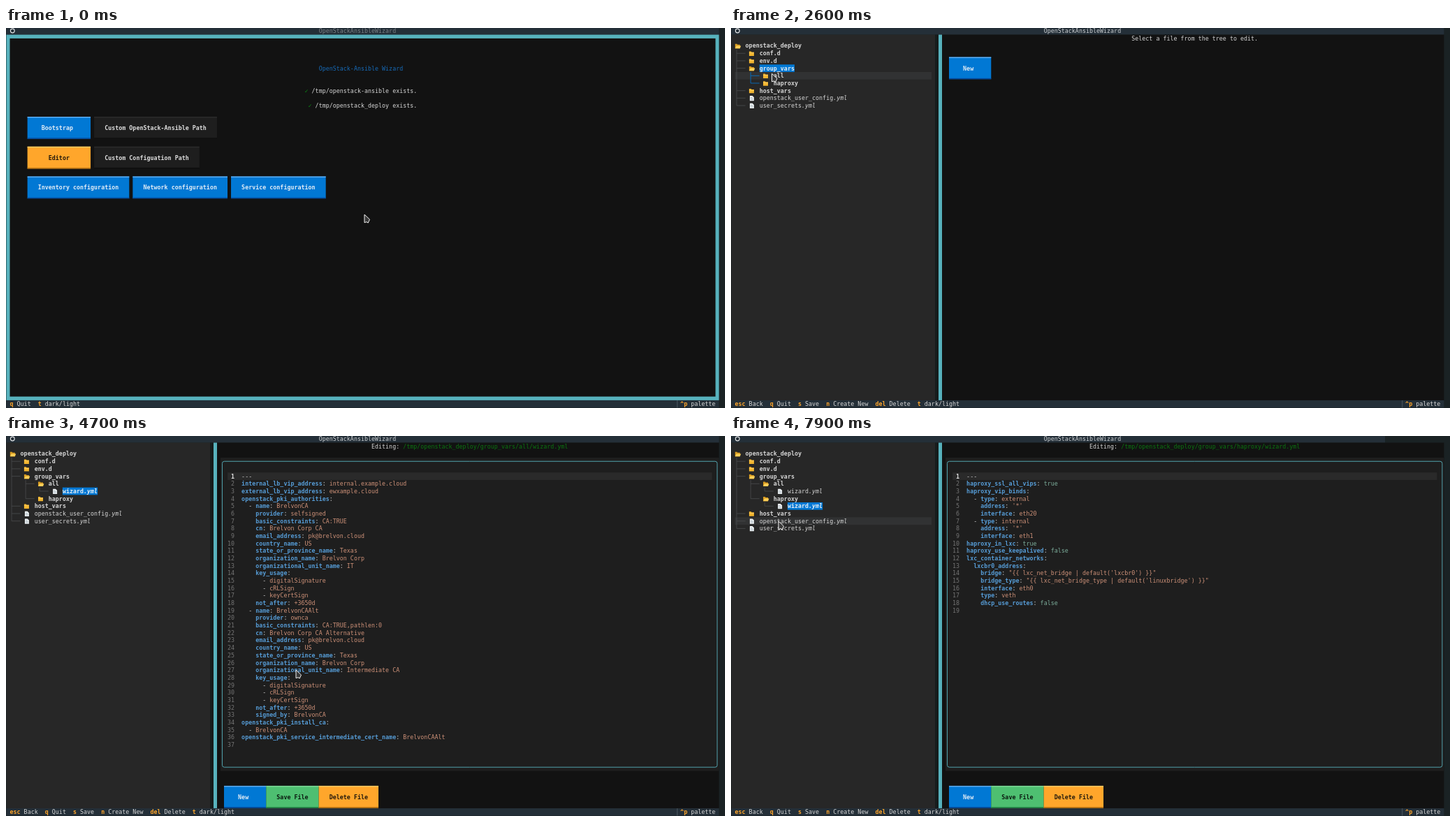
These frames come from a looping animation (1029 by 544 pixels, 8 s). An HTML page with a canvas:

```html
<!DOCTYPE html>
<html lang="en">
<head>
<meta charset="utf-8">
<title>Deployment wizard</title>
<style>
  html, body { margin: 0; width: 100%; height: 100%; overflow: hidden; background: #1a2224; }
  canvas { display: block; }
</style>
</head>
<body>
<canvas id="stage" width="1029" height="544"></canvas>
<script>
const ctx = document.getElementById('stage').getContext('2d');
const LOOP = 8000, STEP = 100;
const CELL_W = 5.024, CELL_H = 10.68, COLS = 203;
const TEAL = '#57b2bd', BLUE = '#0178d4', ORANGE = '#ffa62b', GREEN = '#0b7410', FG = '#d6d6d6';

const colX = col => 0.5 + col * CELL_W;
const rowY = row => row * CELL_H - 1.1;

function rect(x0, y0, x1, y1, color) {
  ctx.fillStyle = color;
  ctx.fillRect(x0, y0, x1 - x0, y1 - y0);
}

function cells(col, row, width, height, color) {
  rect(colX(col), rowY(row), colX(col + width), rowY(row + height), color);
}

// Writes one glyph per terminal cell and returns the column after the text.
function text(col, row, string, color = FG, style = '') {
  ctx.save();
  ctx.translate(colX(col), rowY(row) + 8.2);
  ctx.scale(0.1, 0.1);
  ctx.font = `${style} 83.45px "DejaVu Sans Mono", monospace`;
  ctx.fillStyle = color;
  [...string].forEach((char, i) => {
    if (char !== ' ') ctx.fillText(char, i * CELL_W * 10, 0);
  });
  ctx.restore();
  return col + string.length;
}

function lines(color, width, ...paths) {
  ctx.strokeStyle = color;
  ctx.lineWidth = width;
  ctx.beginPath();
  for (const [x0, y0, x1, y1] of paths) {
    ctx.moveTo(x0, y0);
    ctx.lineTo(x1, y1);
  }
  ctx.stroke();
}

function polygon(points, fill) {
  ctx.beginPath();
  points.forEach(([x, y]) => ctx.lineTo(x, y));
  ctx.closePath();
  ctx.fillStyle = fill;
  ctx.fill();
}

const BUTTONS = {
  primary: [BLUE, '#66b2f5', '#06489a', '#e2ecf6'],
  warning: [ORANGE, '#ffd066', '#b97310', '#21180c'],
  success: ['#4ebf71', '#82e29c', '#1f8345', '#0b1a10'],
  plain: ['#1e1e1e', '#2c2c2c', '#0d0d0d', '#dedede'],
};

function button(col, row, width, label, kind = 'primary') {
  const [fill, top, bottom, color] = BUTTONS[kind];
  const x0 = colX(col), x1 = colX(col + width), y0 = rowY(row), y1 = rowY(row + 3);
  rect(x0, y0, x1, y1 - 0.4, fill);
  rect(x0, y0, x1, y0 + 1.4, top);
  rect(x0, y1 - 1.8, x1, y1 - 0.4, bottom);
  text(col + Math.floor((width - label.length) / 2), row + 1, label, color, 'bold');
}

function bars(titleColor, headerEnd, keys) {
  rect(0.5, 0, headerEnd, rowY(1), '#242f38');
  rect(0.5, rowY(50), 1020.4, 543.6, '#242f38');
  ctx.beginPath();
  ctx.arc(9.3, 4, 2.9, 0, 7);
  ctx.strokeStyle = '#e4e6e8';
  ctx.lineWidth = 1.1;
  ctx.stroke();
  text(89, 0, 'OpenStackAnsibleWizard', titleColor);
  let col = 1;
  for (const [key, label] of keys) {
    col = text(col, 50, key, ORANGE, 'bold') + 1;
    col = text(col, 50, label) + 2;
  }
  lines('#55616a', 0.8, [960.7, rowY(50), 960.7, 543.6]);
  text(192, 50, '^p', ORANGE, 'bold');
  text(195, 50, 'palette');
}

function homeScreen() {
  bars('#7c8287', 1020.4, [['q', 'Quit'], ['t', 'dark/light']]);
  rect(0.5, rowY(1), 1020.4, rowY(50), TEAL);
  rect(5.5, 14.9, 1015.4, 527.6, '#121212');
  text(89, 5, 'OpenStack-Ansible Wizard', '#176bb8');
  text(85, 8, '✓', '#0b8a14');
  text(87, 8, '/tmp/openstack-ansible exists.');
  text(86, 10, '✓', '#0b8a14');
  text(88, 10, '/tmp/openstack_deploy exists.');
  button(6, 12, 18, 'Bootstrap');
  button(25, 12, 35, 'Custom OpenStack-Ansible Path', 'plain');
  button(6, 16, 18, 'Editor', 'warning');
  button(25, 16, 30, 'Custom Configuation Path', 'plain');
  button(6, 20, 29, 'Inventory configuration');
  button(36, 20, 27, 'Network configuration');
  button(64, 20, 27, 'Service configuration');
}

const folder = (name, ...kids) => ({ name, kids });
const file = name => ({ name });
const allFile = file('wizard.yml'), proxyFile = file('wizard.yml');
const allDir = folder('all', allFile), proxyDir = folder('haproxy', proxyFile);
const groupVars = folder('group_vars', allDir, proxyDir);
const root = folder('openstack_deploy', folder('conf.d'), folder('env.d'), groupVars,
  folder('host_vars'), file('openstack_user_config.yml'), file('user_secrets.yml'));

const opensAt = new Map([[root, 0], [groupVars, 2300], [allDir, 3100], [proxyDir, 5500]]);
const selections = [[0, root], [2300, groupVars], [3100, allDir], [3800, allFile],
  [5500, proxyDir], [6400, proxyFile]];

function icon(col, row, node, open) {
  const x = colX(col) + 0.3, y = rowY(row) + 2;
  if (!node.kids) {
    polygon([[x + 1, y], [x + 4.7, y], [x + 7, y + 2.2], [x + 7, y + 7.3], [x + 1, y + 7.3]], '#eef2f4');
    lines('#9aaab4', 0.6, [x + 2, y + 2.5, x + 4.6, y + 2.5], [x + 2, y + 4, x + 6, y + 4], [x + 2, y + 5.5, x + 6, y + 5.5]);
    return;
  }
  polygon([[x, y + 0.6], [x + 2.8, y + 0.6], [x + 3.6, y + 1.6], [x + 7, y + 1.6], [x + 7, y + 7], [x, y + 7]],
    open ? '#d69a20' : '#f2b52f');
  if (open) polygon([[x + 1.8, y + 3.2], [x + 8.4, y + 3.2], [x + 7, y + 7], [x + 0.2, y + 7]], '#ffd059');
  else rect(x, y + 2.5, x + 7, y + 3.2, '#ffd675');
}

function drawTree(time, pointer, selected) {
  const focused = time >= 2300;
  const overTree = pointer.x > 6 && pointer.x < 287;
  const hoverRow = overTree ? Math.floor((pointer.y + 1.1) / CELL_H) : -1;
  let nextRow = 2;

  // "trail" holds, per level, whether that branch continues below.
  function drawNode(node, trail, parents, hovered) {
    const row = nextRow++, depth = trail.length;
    const open = node.kids && time >= (opensAt.get(node) ?? Infinity);
    const y = rowY(row), mid = y + CELL_H / 2, bottom = y + CELL_H;
    hovered ||= row === hoverRow;
    if (hovered) rect(5.5, y, 287, bottom, focused ? '#313233' : '#272727');
    trail.forEach((continues, level) => {
      const x = colX(1.5 + level * 4), own = level === depth - 1;
      const color = focused && parents[level] === selected ? BLUE : '#4b4d4e';
      if (own) lines(color, 0.8, [x, y, x, continues ? bottom : mid], [x, mid, colX(4 + level * 4), mid]);
      else if (continues) lines(color, 0.8, [x, y, x, bottom]);
    });
    const iconCol = 1 + depth * 4, textCol = iconCol + 3;
    icon(iconCol, row, node, open);
    const isSelected = node === selected;
    if (isSelected) cells(textCol, row, node.name.length, 1, focused ? BLUE : '#173c56');
    const weight = node.kids || isSelected ? 'bold' : '';
    const color = isSelected ? '#e8eff6' : FG;
    const split = node.kids ? node.name.length : node.name.indexOf('.');
    const end = text(textCol, row, node.name.slice(0, split), color, weight);
    text(end, row, node.name.slice(split), color, 'italic ' + weight);
    if (open) node.kids.forEach((kid, i) =>
      drawNode(kid, [...trail, i < node.kids.length - 1], [...parents, node], hovered));
  }

  rect(0.5, rowY(1), 292, rowY(50), focused ? '#272727' : '#1e1e1e');
  drawNode(root, [], [], false);
}

const authority = (name, provider, constraints, cn, unit) => `  - name: ${name}
    provider: ${provider}
    basic_constraints: ${constraints}
    cn: ${cn}
    email_address: pk@brelvon.cloud
    country_name: US
    state_or_province_name: Texas
    organization_name: Brelvon Corp
    organizational_unit_name: ${unit}
    key_usage:
      - digitalSignature
      - cRLSign
      - keyCertSign
    not_after: +3650d
`;

const allYaml = `---
internal_lb_vip_address: internal.example.cloud
external_lb_vip_address: ewxample.cloud
openstack_pki_authorities:
${authority('BrelvonCA', 'selfsigned', 'CA:TRUE', 'Brelvon Corp CA', 'IT')}${
  authority('BrelvonCAAlt', 'ownca', 'CA:TRUE,pathlen:0', 'Brelvon Corp CA Alternative', 'Intermediate CA')
}    signed_by: BrelvonCA
openstack_pki_install_ca:
  - BrelvonCA
openstack_pki_service_intermediate_cert_name: BrelvonCAAlt
`;

const proxyYaml = `---
haproxy_ssl_all_vips: true
haproxy_vip_binds:
  - type: external
    address: '*'
    interface: eth20
  - type: internal
    address: '*'
    interface: eth1
haproxy_in_lxc: true
haproxy_use_keepalived: false
lxc_container_networks:
  lxcbr0_address:
    bridge: "{{ lxc_net_bridge | default('lxcbr0') }}"
    bridge_type: "{{ lxc_net_bridge_type | default('linuxbridge') }}"
    interface: eth0
    type: veth
    dhcp_use_routes: false
`;

function drawEditor(yaml) {
  cells(61, 3, 142, 42, '#1e1e1e');
  ctx.beginPath();
  ctx.roundRect(colX(61.5), rowY(3.5), 141 * CELL_W, 41 * CELL_H, 3);
  ctx.strokeStyle = TEAL;
  ctx.lineWidth = 0.9;
  ctx.stroke();
  cells(63, 5, 138, 1, '#2a2a2a');
  yaml.split('\n').forEach((line, i) => {
    const row = 5 + i;
    text(63, row, String(i + 1).padStart(2), i ? '#747474' : '#e0e0e0', i ? '' : 'bold');
    const [, lead, key = '', colon, value] = line.match(/^( *(?:- )?)(\w+(?=:(?: |$)))?(:? ?)(.*)$/);
    const color = value === '---' ? '#cccccc' : /^(true|false)$/.test(value) ? '#7daf9c' : '#ce9178';
    let col = text(67, row, lead, '#cccccc');
    col = text(col, row, key, '#569cd6', 'bold');
    col = text(col, row, colon, '#cccccc');
    text(col, row, value, color);
  });
  button(62, 47, 12, 'New');
  button(74, 47, 15, 'Save File', 'success');
  button(89, 47, 17, 'Delete File', 'warning');
}

function heading(label, path = '') {
  const start = 61 + Math.floor((143 - label.length - path.length) / 2);
  text(text(start, 1, label), 1, path, GREEN);
}

function editorScreen(time, pointer) {
  const selected = selections.findLast(([start]) => time >= start)[1];
  bars('#cdd1d4', selected === proxyFile ? 936 : 1020.4, [['esc', 'Back'], ['q', 'Quit'], ['s', 'Save'],
    ['n', 'Create New'], ['del', 'Delete'], ['t', 'dark/light']]);
  rect(292, rowY(1), 297, rowY(50), '#161c1c');
  rect(297, rowY(1), 302, rowY(50), TEAL);
  rect(302, rowY(1), 1020.4, rowY(50), '#121212');
  drawTree(time, pointer, selected);

  const base = '/tmp/openstack_deploy/group_vars/';
  if (selected === allFile || selected === proxyFile) {
    const isAll = selected === allFile;
    heading('Editing: ', base + (isAll ? 'all' : 'haproxy') + '/wizard.yml');
    drawEditor(isAll ? allYaml : proxyYaml);
    return;
  }
  button(62, 4, 12, 'New');
  if (selected === allDir || selected === proxyDir) {
    heading('Selected directory: ', base + selected.name);
    button(74, 4, 22, 'Delete Directory', 'warning');
  } else {
    heading('Select a file from the tree to edit.');
  }
}

// Pointer stops: time, x, y
const stops = [
  [100, 513, 267], [700, 82, 186], [1100, 82, 186], [1700, 40, 53], [2000, 39.5, 60],
  [2100, 39.5, 61.5], [2300, 39.5, 61.5], [2700, 62, 66], [3100, 62, 66], [3500, 92, 80],
  [3900, 92, 80], [4400, 677, 340], [4600, 640, 342], [4700, 415, 335], [4800, 107, 205],
  [5300, 82, 90], [5800, 82, 90], [6300, 92, 101], [6600, 92, 101], [7000, 490, 312],
  [7100, 490, 312], [7900, 68, 122],
];

function pointerAt(time) {
  const next = stops.findIndex(([t]) => t > time);
  if (next < 1) {
    const [, x, y] = next ? stops.at(-1) : stops[0];
    return { x, y };
  }
  const [t0, x0, y0] = stops[next - 1], [t1, x1, y1] = stops[next];
  const u = (time - t0) / (t1 - t0), eased = u * u * (3 - 2 * u);
  return { x: x0 + (x1 - x0) * eased, y: y0 + (y1 - y0) * eased };
}

function drawPointer({ x, y }) {
  const shape = [[0, 0], [0, 11.6], [3, 10.6], [5.2, 12], [7.5, 7]];
  polygon(shape.map(([dx, dy]) => [x + dx, y + dy]), '#3a3a3a');
  ctx.strokeStyle = '#f2f2f2';
  ctx.lineWidth = 1;
  ctx.lineJoin = 'round';
  ctx.stroke();
}

function render(now) {
  const time = Math.floor((now % LOOP) / STEP) * STEP;
  const pointer = pointerAt(time);
  rect(0, 0, 1029, 544, '#1a2224');
  if (time < 800) homeScreen();
  else editorScreen(time, pointer);
  drawPointer(pointer);
  requestAnimationFrame(tick);
}

let start;
function tick(now) {
  start ??= now;
  render(now - start);
}
requestAnimationFrame(tick);
</script>
</body>
</html>
```
